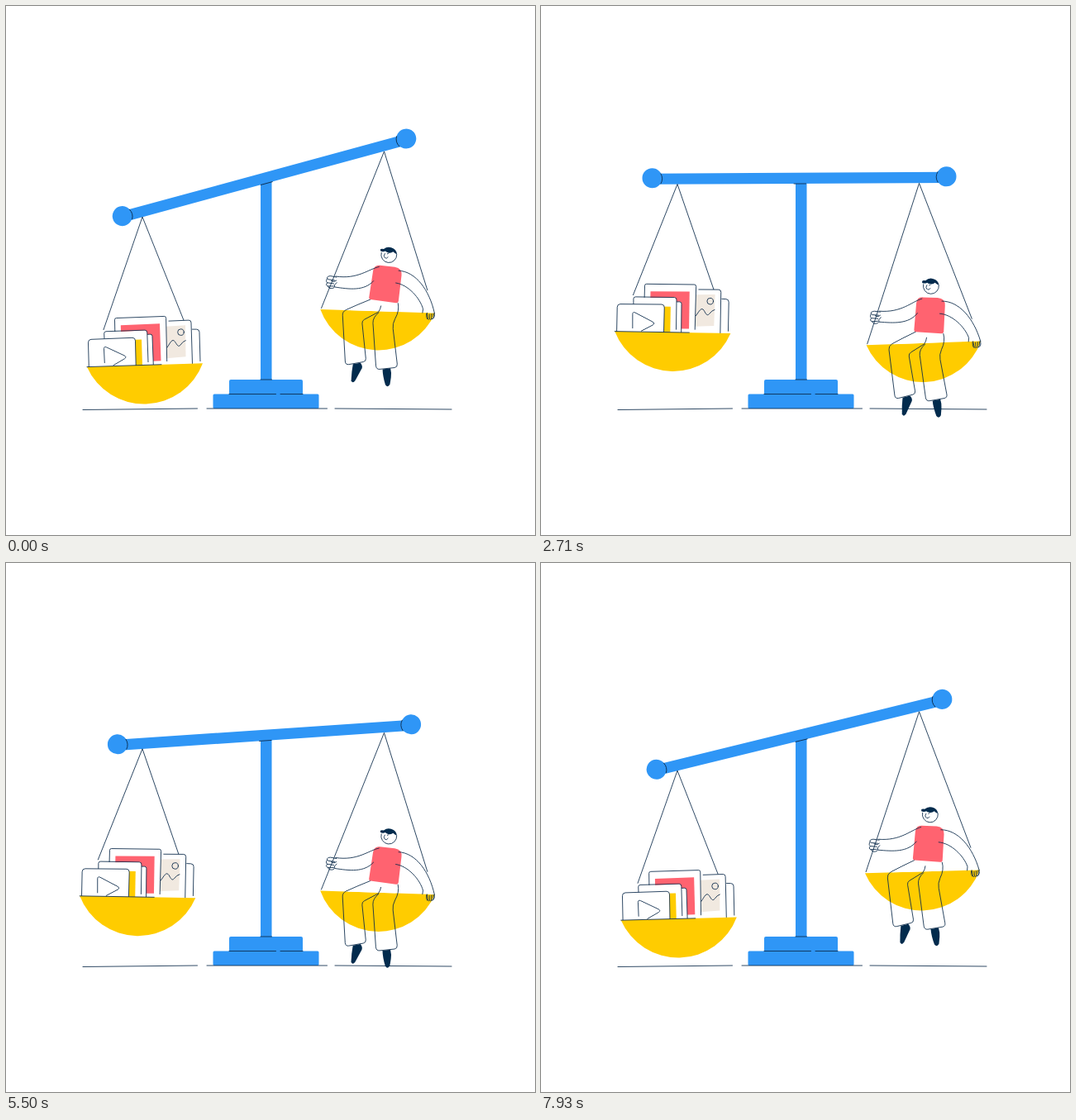
An HTML page that plays this animation: 640 by 640 pixels, repeating every 8000 ms.

```html
<!DOCTYPE html>
<html lang="en">
<head>
<meta charset="utf-8">
<title>Balance scale</title>
<style>
  html, body { margin: 0; width: 100%; height: 100%; overflow: hidden; background: #fff; }
  svg { display: block; width: 100%; height: 100%; }
  .line { fill: none; stroke: #0b2a4a; stroke-width: .85; stroke-linecap: round; stroke-linejoin: round; }
  .card { fill: #fff; }
  .blue { fill: #2f96f6; }
  .yellow { fill: #ffcc00; }
  .red { fill: #ff6370; }
  .beige { fill: #f1e9e0; }
  .navy { fill: #022b4d; }
</style>
</head>
<body>
<svg viewBox="0 0 640 640">
  <!-- ground and stand -->
  <path class="line" d="M93 488.500L231.500 487M398 487L539 488"/>
  <g class="blue">
    <rect x="308" y="212" width="13.500" height="241"/>
    <rect x="270" y="452" width="89" height="18.500" rx="2"/>
    <rect x="250.500" y="469.500" width="128" height="17.400" rx="1.500"/>
  </g>
  <path class="line" d="M308 452H321.500M270 469.500H326.500M332 469.500H359M243 487H388.500"/>

  <g id="beam">
    <g class="blue">
      <rect x="134" y="201.700" width="357" height="13.200"/>
      <circle cx="134.500" cy="207.300" r="12"/>
      <circle cx="490.500" cy="207.300" r="12"/>
    </g>
    <path class="line" d="M145 202A12 12 0 0 1 145 214M480 201.500A12 12 0 0 0 480 214M306 215H320.500"/>
  </g>

  <g id="media">
    <path class="line" d="M118 391.500L165 255L215 380"/>
    <path class="line" d="M225.500 391H230.500Q233.800 391 234 394.500L235 429.500"/>
    <path class="card" d="M192 381L221 380Q224 380 224 383L225.500 433H192Z"/>
    <path class="beige" d="M193 387.500L217 386L217.500 424L194 426Z"/>
    <path class="line" d="M197 381L221 380Q224 380 224 383L225.500 432.500M195 413C199 407 201 401.500 204.500 406C207 410 208.500 413 211 410Q214 405.500 217.300 404.500"/>
    <circle class="line" cx="211.500" cy="394.500" r="3.800"/>

    <path class="card" d="M131.500 378L191 375.500Q193.500 375.500 193.500 378L194.500 434L132 435Z"/>
    <path class="red" d="M138.800 386L186 384L187.500 429L140 431Z"/>
    <path class="line" d="M131.800 393.500L131.500 379.500Q131.500 377.500 133.500 377.400L191.500 375.300Q193.500 375.300 193.600 377.500L194.700 429.500"/>

    <path class="card" d="M168 397L174.500 397Q177 397 177 399.500L178.300 434H168Z"/>
    <path class="line" d="M171 397.200L174.500 397Q177 397 177 399.500L178.300 433.500"/>
    <path class="card" d="M118.700 395L169 392L170.700 395L172 434.500H119Z"/>
    <path class="yellow" d="M150 403.800L164 403.300L165 434.500H151Z"/>
    <path class="line" d="M119 403L118.700 396Q118.700 393.800 121 393.600L168 392Q170.700 392 170.800 395L172 430.500"/>

    <path class="card" d="M100 436L99.500 407Q99.500 403.400 103 403.200L153 401.200Q156.500 401.200 156.500 405L157.200 435Z"/>
    <path class="line" d="M100.300 436.500L99.500 407Q99.500 403.400 103 403.200L153 401.200Q156.500 401.200 156.500 405L157.200 435M119.300 431.500L118.500 414.500Q118.500 411.500 121.500 412.700L143 422.700Q146.500 424.500 143.500 426.600L130 434.500"/>
    <path class="yellow" d="M98 436.500L238 432A75.600 75.600 0 0 1 98 436.500Z"/>
    <path class="line" d="M98 436.500L188 433.600"/>
  </g>

  <g id="rider">
    <path class="line" d="M388 404L457.500 212L515.500 378"/>
    <path class="yellow" d="M386.800 405.500H525.500A74.600 74.600 0 0 1 386.800 405.500Z"/>
    <g class="navy">
      <path d="M428.500 470.500L437.500 468.500Q440.500 472 439.500 475L432 490Q429 494.500 427 490.500Q427 481 428.500 470.500Z"/>
      <path d="M464.500 475.500L474 474Q475.700 480 475 485L474 493.500Q471.500 498 468.500 494Q465 484 464.500 475.500Z"/>
    </g>
    <!-- trousers -->
    <path class="card" d="M446 391L420 404.500V405.500H478L481 394Z"/>
    <path class="line" d="M447 391.500Q430 399 418 405Q413.500 407.500 414 412L419 467.500Q419.500 471.700 423.500 471L441 467.300Q444.300 466.500 443.800 463L438 421Q437.500 417.500 440.500 416L457 406.500Q459.500 403 460 399"/>
    <path class="line" d="M457.500 407Q450.500 413 451 420L456.300 471.500Q457 476 461 475.500L479 473Q482.500 472.300 482 468.500L475.500 426Q474.500 420 477.500 414Q482.800 404 480.500 395"/>
    <!-- torso and arms -->
    <path class="red" d="M447 391.500Q445 391.300 445.200 389L449 357Q450 349.500 457 350L475 351.200Q484.500 352.500 483.600 361L481 392Q480.800 394.800 478 394.600Z"/>
    <path class="line" d="M456 351.700C443 355 431 368 404 365M450 369C439 382 421 380 403.500 378"/>
    <path class="line" d="M480 355.500C501 356 518 378 525 405.500M477 370.500C492 372 507 388 511 401L510.500 405.500"/>
    <path class="line" d="M405 366L398 364.800Q393.500 365 393.800 367.500Q394.500 369.800 398 369.300L403 370M393.800 368Q391.800 371.500 394 373L402 374M394 373Q391.500 376 394.500 377.200L402 377M395 377.500Q396 380.500 400 379.800Q404 379 403 375.500L405.500 372.500M398.500 370Q401 373 405 370"/>
    <path class="line" d="M516 405.500L517.300 412.500Q518.500 414.500 519.300 412.500L518.800 407M519.300 412.500Q520.500 414.500 521.800 412.500L521.300 406.500M521.800 412.500Q523.300 413.500 524 411.500L523.600 406M524 411.500Q526 410 525 405.500M515.300 406.500Q515 411.500 516.500 413"/>
    <!-- head -->
    <path class="line" d="M458.300 334.500A9.500 9.500 0 1 0 477 336M462.500 335.500Q460.200 338.500 462.500 340.500M463.500 341Q465 342 466.500 339.500M465.500 335.700L466.700 335.200"/>
    <path class="navy" d="M457 330.500Q458 329.300 461 330Q465 326.600 470 328Q476.500 329.800 477.200 336Q474.500 334.800 472.500 332.800Q470 335 466.500 334.200Q464 333.500 463 332.500Q460 334 457 332.500Z"/>
  </g>
</svg>
<script>
  const LOOP = 8000;
  const RAD = Math.PI / 180;
  const CENTER = { x: 312.5, y: 207.3 };

  // [ms, degrees] of beam tilt, joined by a smooth curve
  const beamKeys = [
    [0, 15.25], [860, 10.5], [1570, 3.9], [1710, 3.1], [2450, 0.1], [2710, 0.3],
    [3430, 0.9], [4070, 1.25], [5140, 2.75], [5500, 3.87], [6000, 5.9],
    [6500, 8.15], [6860, 9.9], [7710, 13.1], [8000, 14]
  ];
  // turning points of the right pan's swing
  const swingKeys = [[200, 2], [2750, -2], [5350, 2], [7650, -2], [8900, 2]];

  const byId = id => document.getElementById(id);
  const beam = byId('beam'), media = byId('media'), rider = byId('rider');

  function segment(keys, t) {
    let i = 0;
    while (i < keys.length - 2 && t >= keys[i + 1][0]) i++;
    return i;
  }

  function slope(keys, i) {
    const a = keys[Math.max(i - 1, 0)], b = keys[Math.min(i + 1, keys.length - 1)];
    return (b[1] - a[1]) / (b[0] - a[0]);
  }

  function smooth(keys, t) {
    const i = segment(keys, t);
    const [t0, v0] = keys[i], [t1, v1] = keys[i + 1];
    const d = t1 - t0, p = (t - t0) / d, q = 1 - p;
    return q * q * (1 + 2 * p) * v0 + p * p * (1 + 2 * q) * v1
      + p * q * d * (q * slope(keys, i) - p * slope(keys, i + 1));
  }

  function swing(keys, t) {
    const i = segment(keys, t);
    const [t0, v0] = keys[i], [t1, v1] = keys[i + 1];
    const p = (t - t0) / (t1 - t0);
    return v0 + (v1 - v0) * (1 - Math.cos(Math.PI * p)) / 2;
  }

  function hang(group, x, restY, y, angle) {
    group.setAttribute('transform', `translate(0 ${y - restY}) rotate(${angle} ${x} ${restY})`);
  }

  function draw(t) {
    const tilt = smooth(beamKeys, t);
    const rise = Math.tan(tilt * RAD);
    const leftAngle = -2 * Math.cos(2 * Math.PI * (t - 4100) / 4320);
    beam.setAttribute('transform', `rotate(${-tilt} ${CENTER.x} ${CENTER.y})`);
    hang(media, 165, 255, 214.8 + 148 * rise, leftAngle + 1.9);
    hang(rider, 457.5, 212, 215.2 - 144 * rise, swing(swingKeys, t));
  }

  const start = performance.now();
  function tick() {
    draw((performance.now() - start) % LOOP);
    requestAnimationFrame(tick);
  }
  tick();
</script>
</body>
</html>
```
